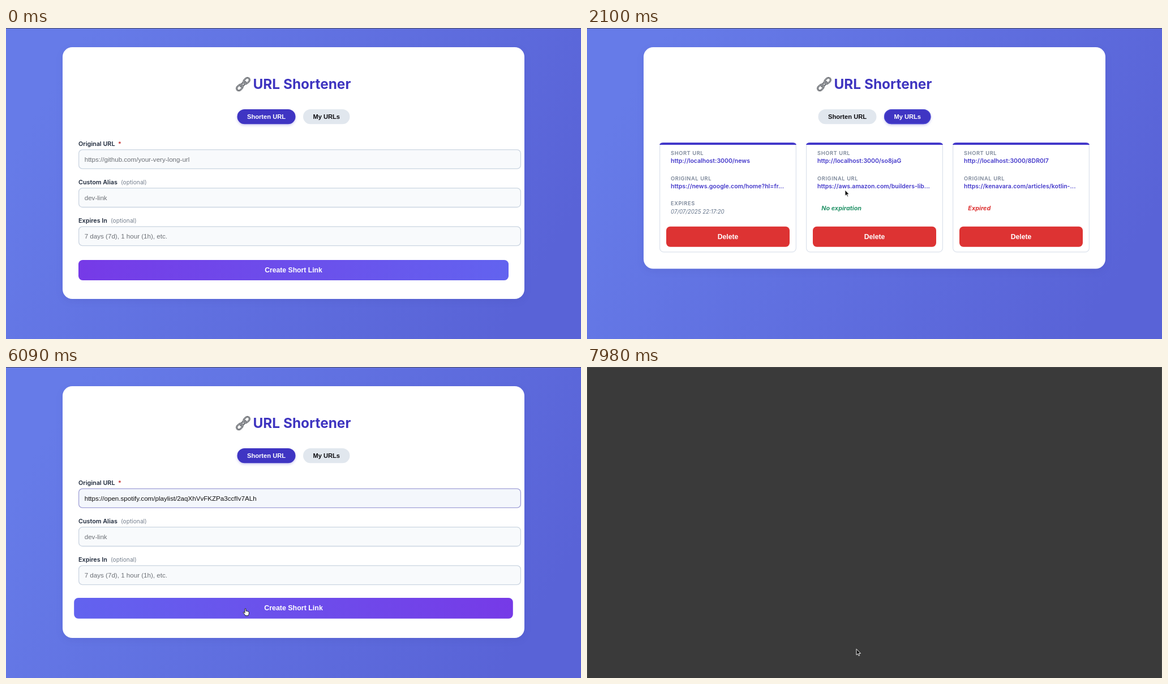
Recreate the animation shown at these times as an HTML page. Size 1016x551 px, loop 8 s.

```html
<!DOCTYPE html>
<html lang="en">
<head>
<meta charset="utf-8">
<title>URL Shortener</title>
<style>
  html, body { margin: 0; width: 100%; height: 100%; overflow: hidden; background: #5f6fe0; }
  svg { display: block; }
  text { font-family: Inter, "Noto Sans", sans-serif; font-weight: 600; font-size: 10.8px; white-space: pre; }
  .ui { font-family: "Liberation Sans", Arial, sans-serif; }
  .mid { text-anchor: middle; }
  .tab { font-size: 11.15px; font-weight: 700; }
  .btn { font-size: 12.2px; font-weight: 700; fill: #fff; }
  .field { font-size: 11.6px; font-weight: 400; fill: #6c7076; }
  .label { fill: #1e293b; }
  .note { font-size: 10.2px; font-weight: 400; fill: #76808f; }
  .cap { font-size: 9.3px; letter-spacing: .6px; fill: #7c8799; }
  .url { font-size: 10.5px; fill: #4338ca; }
  .date { font-size: 9.7px; font-weight: 400; font-style: italic; fill: #64748b; }
  .state { font-weight: 700; font-style: italic; }
</style>
</head>
<body>
<svg id="stage" width="1016" height="551" viewBox="0 0 1016 551">
  <defs>
    <linearGradient id="sky" gradientUnits="userSpaceOnUse" x1="120" y1="40" x2="896" y2="511">
      <stop stop-color="#667be8"/><stop offset="1" stop-color="#5963d7"/>
    </linearGradient>
    <linearGradient id="violet"><stop stop-color="#763ae7"/><stop offset="1" stop-color="#6263ef"/></linearGradient>
    <linearGradient id="violetHover"><stop stop-color="#6263ef"/><stop offset="1" stop-color="#763ae7"/></linearGradient>
  </defs>

  <g id="page">
    <rect width="1016" height="551" fill="url(#sky)"/>
    <rect width="1016" height="1" fill="#464a64"/>
    <rect id="panel" x="100" y="34" width="816" rx="17" fill="#fff"
      style="filter:drop-shadow(0 4px 6px rgba(50,50,140,.1))"/>

    <g id="chain" transform="translate(419 99.5) rotate(-45)" fill="none"></g>
    <text x="436.5" y="108.4" style="font-size:24.4px;font-weight:700" fill="#3f35c0">URL Shortener</text>
    <g id="tabs"></g>

    <g id="form">
      <g id="fields"></g>
      <g id="create">
        <rect id="createBox" x="128" y="411" width="760" height="36" rx="7.5"/>
        <text class="ui btn mid" x="508" y="433">Create Short Link</text>
      </g>
    </g>

    <g id="cards"></g>

    <g id="result">
      <rect x="128.6" y="469.6" width="758.8" height="57.3" rx="6.5" fill="#ecfdf3" stroke="#bdf3d2" stroke-width="1.3"/>
      <text class="mid" x="508" y="494.8" style="font-size:12px" fill="#1f9a60">Short URL:</text>
      <text id="link" class="mid" x="508" y="510" style="font-size:12.8px" text-decoration="underline">http://localhost:3000/aAtNvL</text>
    </g>
  </g>

  <g id="blank">
    <rect width="1016" height="551" fill="#3a3a3a"/>
    <rect x=".5" y=".5" width="1015" height="551" fill="none" stroke="#4b4b4b"/>
  </g>

  <g id="cursor" stroke-linejoin="round" stroke-linecap="round">
    <path id="arrow" d="M0 0V10.2L2.4 8L4 11.7L5.7 11L4.1 7.4H7.2Z" fill="#111" stroke="#fff" stroke-width=".9"/>
    <path id="hand" fill="#fff" stroke="#111" stroke-width=".9"
      d="M-1 7V1Q-1 0 0 0T1 1V4.4Q2.2 3.7 2.8 4.8Q4 4.2 4.5 5.3Q6.3 4.9 6.3 6.6V9Q6 10.6 5.2 11.4V12.6H-.4V11.6L-3.6 7.6Q-4.2 6.2-3 6.1Q-2 6.3-1 7.6Z"/>
    <path id="beam" fill="none" stroke="#222" stroke-width="1.1"
      d="M-2.6-6Q-.4-6 0-5Q.4-6 2.6-6M0-5V5M-2.6 6Q-.4 6 0 5Q.4 6 2.6 6M-1.4 1.6H1.4"/>
  </g>
</svg>

<script>
const LOOP = 8000, STEP = 70;
const T = { list: 1400, cards: 1635, form: 3145, focus: 3990, paste: 4480, hover: 5440,
            blur: 5980, done: 6160, leave: 6790, link: 7060, blank: 7560 };
const PASTED = 'https://open.spotify.com/playlist/2aqXhVvFKZPa3ccfIv7ALh';
const ACTIVE = '#3f35c3', IDLE = '#e1e7ee';

const $ = id => document.getElementById(id);
const set = (el, attrs) => { for (const k in attrs) el.setAttribute(k, attrs[k]); };
const show = (el, on) => { el.style.display = on ? '' : 'none'; };
const mix = (a, b, p) => `color-mix(in srgb, ${b} ${(p * 100).toFixed(1)}%, ${a})`;
const text = (cls, x, y, s, extra = '') => `<text class="${cls}" x="${x}" y="${y}" ${extra}>${s}</text>`;

// CSS "ease" curve, solved by bisection
function ease(x) {
  if (x <= 0) return 0;
  if (x >= 1) return 1;
  const at = (u, a, b) => 3 * a * u * (1 - u) ** 2 + 3 * b * u * u * (1 - u) + u ** 3;
  let lo = 0, hi = 1;
  for (let i = 0; i < 24; i++) {
    const m = (lo + hi) / 2;
    if (at(m, .25, .25) < x) lo = m; else hi = m;
  }
  return at(lo, .1, 1);
}
const tween = (t, start, ms) => ease((t - start) / ms);

$('chain').innerHTML = [['#3c3f44', 3.4], ['#c9ccd0', 1.3]].map(([c, w]) =>
  [-8.6, 8.6, 0].map(x =>
    `<rect x="${x - 6}" y="${x ? -3.9 : -2.2}" width="12" height="${x ? 7.8 : 4.4}" rx="${x ? 3.9 : 2.2}" stroke="${c}" stroke-width="${w * (x ? .8 : .7)}"/>`
  ).join('')).join('');

$('tabs').innerHTML = [[408.5, 103, 'Shorten URL'], [525, 82.5, 'My URLs']].map(([x, w, s]) =>
  `<g><rect x="${x}" y="144" width="${w}" height="26.3" rx="13.1"/>
   <rect x="${x + .8}" y="144.8" width="${w - 1.6}" height="24.7" rx="12.3" fill="none" stroke="#4a4ad6" stroke-opacity=".6" stroke-width="1.6"/>
   ${text('ui tab mid', x + w / 2, 160.7, s)}</g>`).join('');

$('fields').innerHTML = [
  ['Original URL', 'https://github.com/your-very-long-url', 198, '*'],
  ['Custom Alias', 'dev-link', 203, '(optional)'],
  ['Expires In', '7 days (7d), 1 hour (1h), etc.', 185, '(optional)']
].map(([label, hint, x, note], i) => {
  const y = 215 + i * 68.1;
  return text('label', 128, y - 6.3, label)
    + (i ? text('note', x, y - 6.3, note) : text('', x, y - 5.8, note, 'fill="#c53030"'))
    + `<rect x="128.6" y="${y + .6}" width="780.8" height="33.8" rx="6.5" fill="#f8fafc" stroke="#cbd5e1" stroke-width="1.3"/>`
    + text('ui field', 138.7, y + 21.7, hint);
}).join('');

$('cards').innerHTML = [
  ['news', 'news.google.com/home?hl=fr...', text('cap', 20, 314.4, 'EXPIRES') + text('date', 20, 328.6, '07/07/2025 22:17:20')],
  ['so8jaG', 'aws.amazon.com/builders-lib...', text('state', 27.3, 323.2, 'No expiration', 'fill="#27946a"')],
  ['8DR0I7', 'kenavara.com/articles/kotlin-...', text('state', 27.3, 323.2, 'Expired', 'fill="#dd3333"')]
].map(([slug, url, expiry], i) =>
  `<g transform="translate(${128 + i * 259} 0)">
   <rect x=".6" y="203.6" width="240.8" height="193.3" rx="7" fill="#fff" stroke="#dbe2ec" stroke-width="1.2"/>
   <path d="M0 207Q1 203 7 203H235Q241 203 242 207Z" fill="#4338ca"/>
   ${text('cap', 20, 225.4, 'SHORT URL')}${text('url', 20, 239, 'http://localhost:3000/' + slug)}
   ${text('cap', 20, 270.4, 'ORIGINAL URL')}${text('url', 20, 283.8, 'https://' + url)}${expiry}
   <rect x="12" y="351.7" width="218" height="36" rx="7" fill="#dd3333"/>
   ${text('ui btn mid', 121, 374, 'Delete')}</g>`).join('');

const tabs = [...$('tabs').children].map(g => g.children);
const urlBox = $('fields').querySelector('rect'), urlText = $('fields').querySelector('.field');
const HINT = urlText.textContent;

// time, x, y of the pointer's hot spot
const path = [
  [980, 600, -10], [1050, 586, 30], [1120, 574, 118], [1190, 570, 154], [1850, 570, 154],
  [2170, 440, 306], [2240, 440, 300], [2450, 478, 160], [3920, 478, 160], [4060, 419, 237],
  [5050, 419, 237], [5500, 423, 424], [5600, 423, 428], [6720, 423, 428], [7140, 474, 496],
  [7210, 476, 500], [8000, 476, 500]
];

function pointer(t) {
  const i = Math.max(1, path.findIndex(k => k[0] > t));
  const [t0, x0, y0] = path[i - 1], [t1, x1, y1] = path[i];
  const u = Math.max(0, (t - t0) / (t1 - t0)), p = u * u * (3 - 2 * u);
  return [x0 + (x1 - x0) * p, y0 + (y1 - y0) * p];
}

function pointerKind(t, y, list) {
  const over = (a, b) => y >= a && y <= b;
  if (t >= T.blank) return 'arrow';
  if (over(144, 170)) return 'hand';
  if (list) return 'arrow';
  if (over(215, 250) || over(283, 318) || over(351, 386)) return 'beam';
  return over(409, 447) || over(496, 513) ? 'hand' : 'arrow';
}

function render(t) {
  const list = t >= T.list && t < T.form, done = t >= T.done;
  show($('page'), t < T.blank);
  show($('blank'), t >= T.blank);
  show($('form'), !list);
  show($('cards'), list);
  show($('result'), done);
  set($('panel'), { height: list ? 392.5 : done ? 521 : 446 });
  set($('cards'), { opacity: tween(t, T.cards, 500) });
  set($('result'), { opacity: tween(t, T.done, 480) });

  const toList = tween(t, T.list, 300) - tween(t, T.form, 300);
  tabs.forEach(([pill, ring, label], i) => {
    const on = i ? toList : 1 - toList;
    pill.style.fill = mix(IDLE, ACTIVE, on);
    pill.style.filter = `drop-shadow(0 2px 2px rgba(67,56,202,${(.28 * on).toFixed(3)}))`;
    label.style.fill = mix('#0c0c10', '#fff', on);
    show(ring, i ? list : t >= T.form && t < T.focus);
  });

  const focus = tween(t, T.focus, 200) - tween(t, T.blur, 300);
  urlBox.style.fill = mix('#f8fafc', '#edf2fd', focus);
  urlBox.style.stroke = mix('#cbd5e1', '#5a48c6', focus);
  const filled = t >= T.paste && !done;
  urlText.textContent = filled ? PASTED : HINT;
  urlText.style.fill = filled ? '#111' : '';

  const lift = tween(t, T.hover, 300) - tween(t, T.leave, 300);
  const hover = t >= T.hover && t < T.leave;
  set($('create'), { transform: `translate(508 ${429 - 1.6 * lift}) scale(${1 + .0205 * lift}) translate(-508 -429)` });
  set($('createBox'), { fill: hover ? 'url(#violetHover)' : 'url(#violet)' });
  set($('link'), { fill: t < T.link ? '#4338ca' : '#6b31cb' });

  const [x, y] = pointer(t), kind = pointerKind(t, y, list);
  show($('cursor'), t >= path[0][0]);
  set($('cursor'), { transform: `translate(${x} ${y})` });
  for (const k of ['arrow', 'hand', 'beam']) show($(k), k === kind);
}

const begin = performance.now();
function tick() {
  const t = (performance.now() - begin) % LOOP;
  render(Math.floor(t / STEP) * STEP);
  requestAnimationFrame(tick);
}
tick();
</script>
</body>
</html>
```
